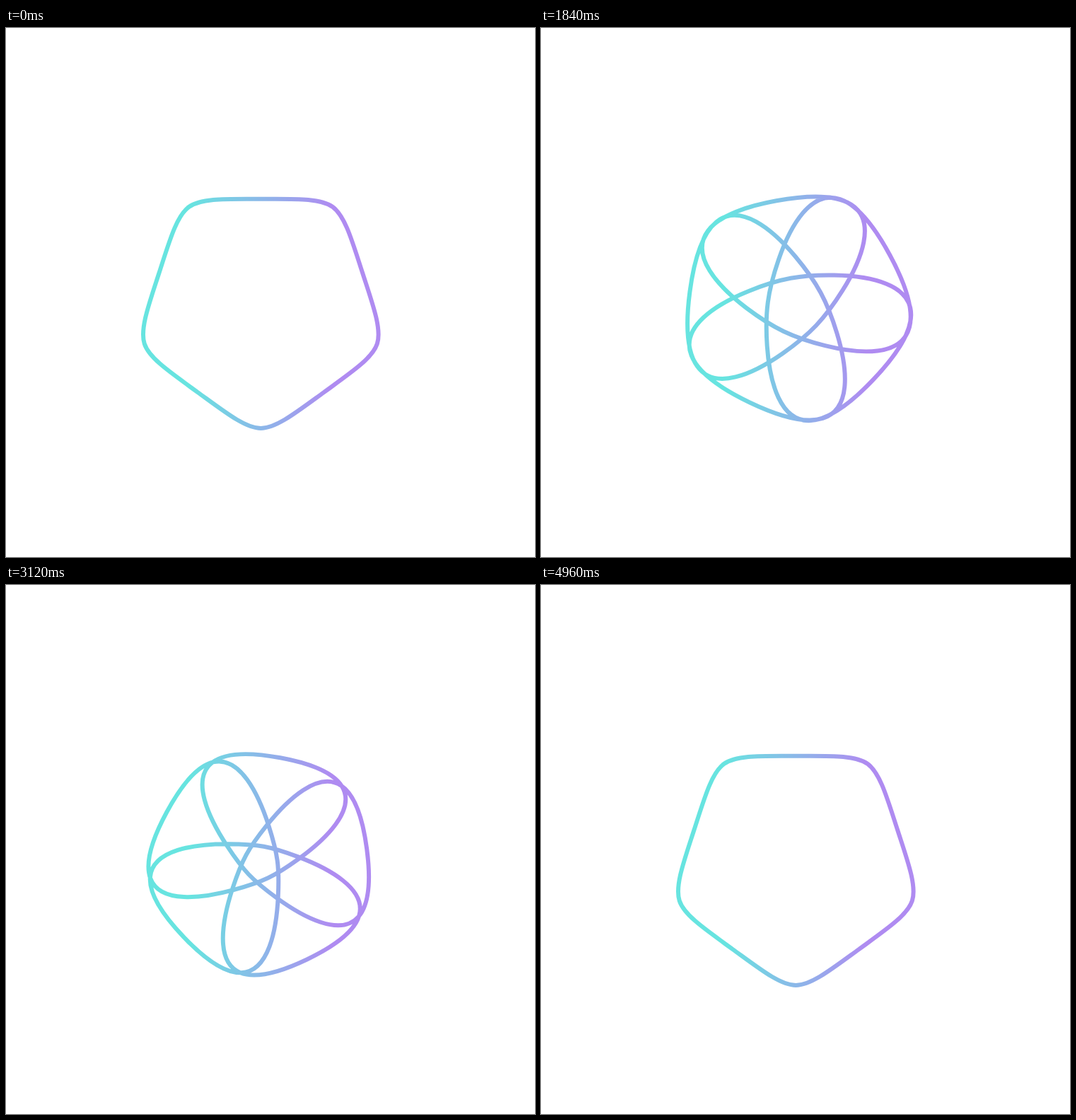
Write an HTML page that moves like this. It is 748 px wide and 748 px high and loops after 5.04 s.

```html
<!DOCTYPE html>
<html lang="en">
<head>
<meta charset="utf-8">
<title>Morphing star</title>
<style>
html, body { margin: 0; width: 100%; height: 100%; overflow: hidden; background: #fff; }
svg { display: block; width: 100vw; height: 100vh; }
</style>
</head>
<body>
<svg viewBox="0 0 748 748">
  <defs>
    <linearGradient id="ink" gradientUnits="userSpaceOnUse" x1="260" y1="0" x2="460" y2="0">
      <stop offset="0" stop-color="#67e4e0"/>
      <stop offset="1" stop-color="#af8bf1"/>
    </linearGradient>
  </defs>
  <path id="star" fill="none" stroke="url(#ink)" stroke-width="6" stroke-linejoin="round"/>
</svg>
<script>
const STEP = 80, STEPS = 63, HALF = 31;
const CX = 360.3, CY = 393, POINTS = 5;
const star = document.getElementById('star');

// Cubic easing with flat ends; x1 and x2 are the handle positions in time.
function ease(t, x1, x2) {
  let lo = 0, hi = 1;
  for (let i = 0; i < 30; i++) {
    const s = (lo + hi) / 2, r = 1 - s;
    if (3 * r * r * s * x1 + 3 * r * s * s * x2 + s * s * s < t) lo = s; else hi = s;
  }
  return lo * lo * (3 - 2 * lo);
}

// Rises to 1 at the half-way key, then falls back to 0.
function swing(step, rise, fall) {
  return step <= HALF
    ? ease(step / HALF, ...rise)
    : 1 - ease((step - HALF) / HALF, ...fall);
}

const mix = (a, b, k) => a + (b - a) * k;

// Rounded star: tangents stay perpendicular to each arm.
function starPath(outer, inner, outerRound, innerRound, turn) {
  const unit = Math.PI / (2 * POINTS);
  const nodes = [];
  for (let i = 0; i < POINTS * 2; i++) {
    const r = i % 2 ? inner : outer;
    const handle = Math.abs(r) * unit * (i % 2 ? innerRound : outerRound);
    const a = turn - Math.PI / 2 + i * Math.PI / POINTS;
    const c = Math.cos(a), s = Math.sin(a);
    nodes.push({ x: CX + r * c, y: CY + r * s, dx: -s * handle, dy: c * handle });
  }
  const at = (n, k) => (n.x + k * n.dx).toFixed(2) + ' ' + (n.y + k * n.dy).toFixed(2);
  let d = 'M' + at(nodes[0], 0);
  nodes.forEach((n, i) => {
    const next = nodes[(i + 1) % nodes.length];
    d += `C${at(n, 1)} ${at(next, -1)} ${at(next, 0)}`;
  });
  return d + 'Z';
}

function draw(ms) {
  const step = Math.floor(ms / STEP) % STEPS;
  const size = swing(step, [0.333, 0.686], [0.2, 0.667]);
  const curl = swing(step, [0.55, 0.415], [0.468, 0.458]);
  star.setAttribute('d', starPath(
    151.2,
    mix(173, -85, size),
    mix(1, -5.2, curl),
    mix(0.4, 4.65, curl),
    Math.PI * step / HALF
  ));
}

const start = performance.now();
function tick() {
  draw(performance.now() - start);
  requestAnimationFrame(tick);
}
tick();
</script>
</body>
</html>
```
